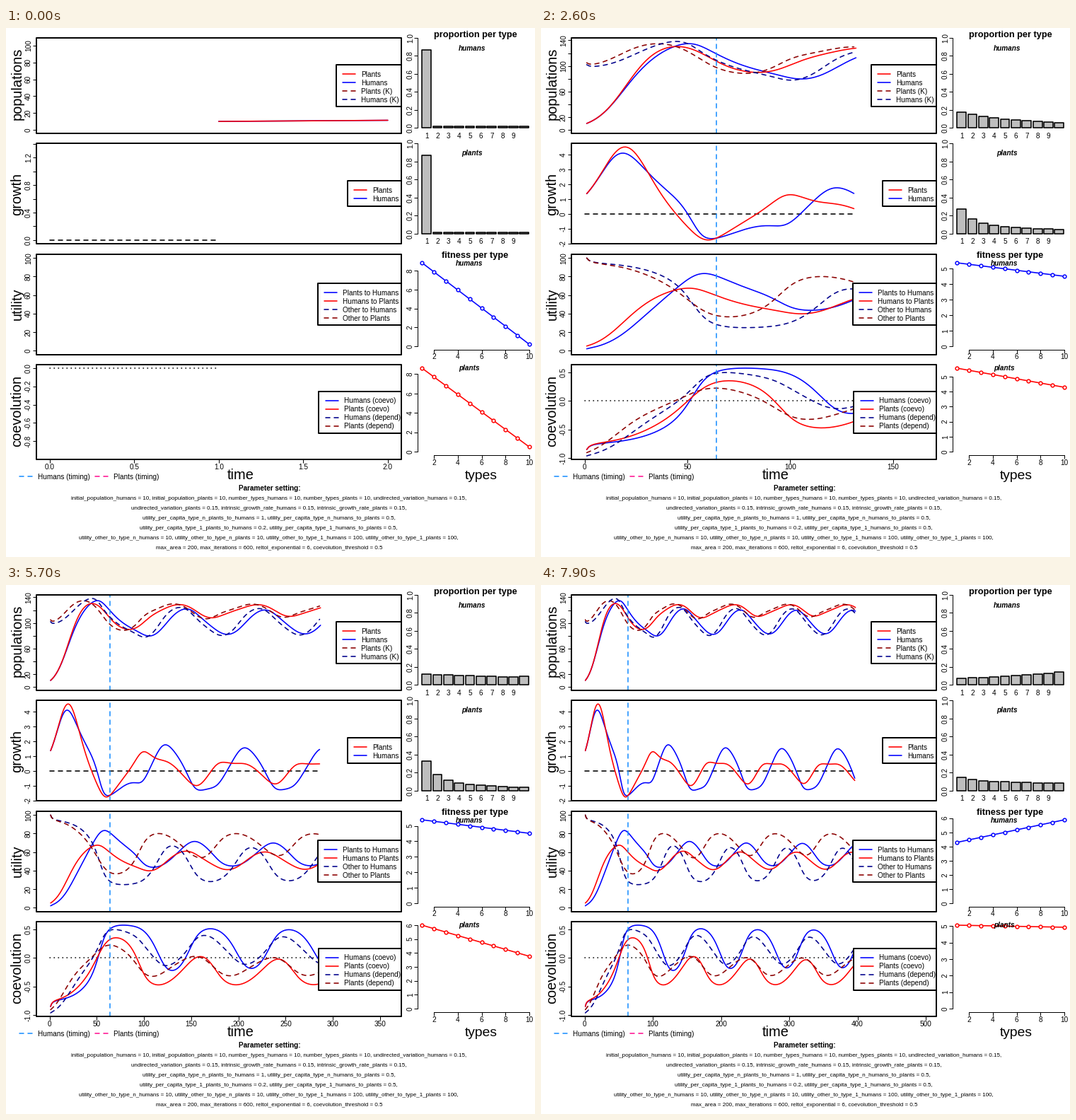
Write a matplotlib script that moves like this. It is 748 px wide and 748 px high and loops after 8000 ms.

```python
import numpy as np
import matplotlib.pyplot as plt
from matplotlib.animation import FuncAnimation
from matplotlib.patches import Rectangle

SIZE, DPI = 748, 100
PX = 72 / DPI
FRAMES, STEP = 80, 5
RED, BLUE, DRED, DBLUE = "#ff0000", "#0000ff", "#8b0000", "#00008b"
DODGER, PINK = "#1e90ff", "#ff1493"
DASH, DOT, SOLID = (6, 6), (0.5, 5.5), None
SMALL, CURVE = 10, 1.6

plt.rcParams.update({
    "font.family": "Liberation Sans",
    "lines.scale_dashes": False,
    "lines.solid_capstyle": "round",
    "lines.dash_capstyle": "round",
    "lines.solid_joinstyle": "round",
})


def simulate(steps, n=10, v=0.15, r=0.15, threshold=0.5):
    """Human-plant coevolution: logistic growth plus selection among types."""
    i = np.arange(1, n + 1)
    weight = np.linspace(-1, 1, n)
    other = np.linspace(100, 10, n)
    gain = np.linspace(0.2, 1, n)
    ph = np.eye(n)[0]
    pp = ph.copy()
    h = p = 10.0
    rows = {k: [] for k in ("H P KH KP gH gP PH HP OH OP cH cP dH dP "
                            "mixH mixP fitH fitP").split()}

    def select(mix, util, oth):
        fit = ((n - i) * oth + i * util) / (oth + util)
        new = mix * fit
        return fit, new / new.sum(), (util - oth) / (util + oth)

    for _ in range(steps):
        u_ph, u_hp = p * (pp @ gain), h * 0.5
        u_oh, u_op = ph @ other, pp @ other
        kh, kp = u_ph + u_oh, min(u_hp + u_op, 200)
        gh, gp = r * h * (1 - h / kh), r * p * (1 - p / kp)
        mh, mp = (1 - v) * ph + v / n, (1 - v) * pp + v / n
        fh, ph, dh = select(mh, u_ph, u_oh)
        fp, pp, dp = select(mp, u_hp, u_op)
        values = (h, p, kh, kp, gh, gp, u_ph, u_hp, u_oh, u_op,
                  mh @ weight, mp @ weight, dh, dp, mh, mp, fh, fp)
        for key, val in zip(rows, values):
            rows[key].append(val)
        h, p = h + gh, p + gp
    data = {k: np.array(a) for k, a in rows.items()}
    data["timing"] = 1 + int(np.argmax(data["cH"] >= threshold))
    return data


sim = simulate(STEP * FRAMES + 2)

fig = plt.figure(figsize=(SIZE / DPI, SIZE / DPI), dpi=DPI, facecolor="white")
ax = fig.add_axes([0, 0, 1, 1])
ax.set(xlim=(0, SIZE), ylim=(SIZE, 0))
ax.axis("off")
live = []


def line(x, y, color="black", dash=SOLID, width=2, z=2, **kw):
    art, = ax.plot(x, y, color=color, lw=width * PX, zorder=z, **kw)
    if dash:
        art.set_dashes([d * PX for d in dash])
    return art


def text(x, y, s, size=SMALL, ha="center", rot=0, **kw):
    return ax.text(x, y, s, fontsize=size * PX, ha=ha, va="baseline",
                   rotation=rot, rotation_mode="anchor", zorder=6, **kw)


def rect(x0, y0, x1, y1, fill, width=2, z=3):
    art = Rectangle((x0, y0), x1 - x0, y1 - y0, fc=fill, ec="black",
                    lw=width * PX, zorder=z, joinstyle="round")
    return ax.add_patch(art)


def pretty(lo, hi):
    cell = (hi - lo) / 5
    base = unit = 10 ** np.floor(np.log10(cell))
    for mult, bias in ((2, 0.8), (5, 1.7), (10, 0.8)):
        if mult * base - cell < bias * (cell - unit):
            unit = mult * base
    first, last = int(np.ceil(lo / unit - 1e-7)), int(np.floor(hi / unit + 1e-7))
    ticks = np.arange(first, last + 1) * unit
    digits = max(0, -int(np.floor(np.log10(unit) + 1e-9)))
    return ticks, [f"{v:.{digits}f}" for v in ticks]


def label_width(s):
    return SMALL * sum({".": 0.278, "-": 0.333}.get(c, 0.556) for c in s)


def axis(pos, labels, edge, base, vertical, spine=True, ticks=True):
    """Ticks at pixel positions; labels that would crowd are left out."""
    arts, xs, ys, last = [], [], [], -1e9
    for q, s in zip(pos, labels):
        a, b = ([edge, edge - 5, np.nan], [q, q, np.nan]) if vertical else \
               ([q, q, np.nan], [edge, edge + 5, np.nan])
        xs += a
        ys += b
        run, half = (-q if vertical else q), label_width(s) / 2
        if run - half - last >= 0.833 * SMALL:
            last = run + half
            arts.append(text(base, q, s, rot=90) if vertical
                        else text(q, base, s))
    if spine:
        ends, flat = [pos[0], pos[-1]], [edge, edge]
        xs += flat if vertical else ends
        ys += ends if vertical else flat
    if ticks:
        arts.append(line(xs, ys, width=1, z=3, solid_capstyle="butt"))
    return arts


def legend(x, y0, y1, entries):
    rect(x, y0, 559, y1, "white", z=4)
    for k, (name, color, dash) in enumerate(entries):
        y = y0 + 13.2 + 12 * k
        line([x + 9.5, x + 27.5], [y, y], color, dash, CURVE, z=5)
        text(x + 35.5, y + 3.8, name, SMALL, "left")


LEFT, RIGHT, X0, XSPAN = 43, 559, 61.7, 478.2

# key, colour, dash for each curve, in drawing order
PANELS = [
    dict(name="populations", box=(14, 149), mid=78.5, zero=None, extra=1,
         curves=[("H", BLUE, SOLID), ("P", RED, SOLID),
                 ("KP", DRED, DASH), ("KH", DBLUE, DASH)],
         legend=(467, 51.5, 111),
         names=["Humans", "Plants", "Plants (K)", "Humans (K)"],
         order=(1, 0, 2, 3)),
    dict(name="growth", box=(163, 305), mid=235, zero=DASH, extra=0,
         curves=[("gH", BLUE, SOLID), ("gP", RED, SOLID)],
         legend=(483, 216, 252), names=["Humans", "Plants"], order=(1, 0)),
    dict(name="utility", box=(320, 461.5), mid=390, zero=None, extra=0,
         curves=[("PH", BLUE, SOLID), ("HP", RED, SOLID),
                 ("OH", DBLUE, DASH), ("OP", DRED, DASH)],
         legend=(441, 360.5, 420),
         names=["Plants to Humans", "Humans to Plants",
                "Other to Humans", "Other to Plants"], order=(0, 1, 2, 3)),
    dict(name="coevolution", box=(476, 610), mid=541, zero=DOT, extra=0,
         curves=[("cH", BLUE, SOLID), ("cP", RED, SOLID),
                 ("dH", DBLUE, DASH), ("dP", DRED, DASH)],
         legend=(442.5, 513.5, 573),
         names=["Humans (coevo)", "Plants (coevo)",
                "Humans (depend)", "Plants (depend)"], order=(0, 1, 2, 3)),
]

PARAMS = [
    "initial_population_humans = 10, initial_population_plants = 10, "
    "number_types_humans = 10, number_types_plants = 10, "
    "undirected_variation_humans = 0.15,",
    "undirected_variation_plants = 0.15, intrinsic_growth_rate_humans = 0.15, "
    "intrinsic_growth_rate_plants = 0.15,",
    "utility_per_capita_type_n_plants_to_humans = 1, "
    "utility_per_capita_type_n_humans_to_plants = 0.5,",
    "utility_per_capita_type_1_plants_to_humans = 0.2, "
    "utility_per_capita_type_1_humans_to_plants = 0.5,",
    "utility_other_to_type_n_humans = 10, utility_other_to_type_n_plants = 10, "
    "utility_other_to_type_1_humans = 100, utility_other_to_type_1_plants = 100,",
    "max_area = 200, max_iterations = 600, reltol_exponential = 6, "
    "coevolution_threshold = 0.5",
]

BARS = [("mixH", 141, 155.8), ("mixP", 290.5, 304.5)]
FITS = [("fitH", BLUE, 450, 454.5, 467.8), ("fitP", RED, 599, 603.5, 617.6)]
BAR_X = 588.3 + 15.35 * np.arange(10)
TYPE_X = 588.2 + 16.88 * np.arange(10)


def draw_static():
    for p in PANELS:
        rect(LEFT, p["box"][0], RIGHT, p["box"][1], "none")
        text(21.5, p["mid"], p["name"], 20, rot=90)
        legend(*p["legend"],
               [(p["names"][k], *p["curves"][k][1:]) for k in p["order"]])
    text(331.5, 638, "time", 20)
    text(671.5, 638.5, "types", 19.3)

    for x, name, color in ((19.5, "Humans", DODGER), (126.5, "Plants", PINK)):
        line([x, x + 18], [634, 634], color, DASH, CURVE)
        text(x + 26, 638, f"{name} (timing)", SMALL, "left")

    text(663.5, 12.5, "proportion per type", 12.7, weight="bold")
    text(663.5, 324.7, "fitness per type", 12.7, weight="bold")
    for x, y, s in ((659.5, 31.5, "humans"), (659.5, 179.5, "plants"),
                    (655, 335.5, "humans"), (655, 483.8, "plants")):
        text(x, y, s, SMALL, weight="bold", style="italic")

    shares = np.arange(6) / 5
    for _, zero, base in BARS:
        axis(zero - 127.3 * shares, [f"{s:.1f}" for s in shares], 582, 574.8, True)
        axis(BAR_X + 6.4, [str(k) for k in range(1, 11)], zero, base, False,
             spine=False, ticks=False)
    for _, _, _, edge, base in FITS:
        axis(TYPE_X[1::2], ["2", "4", "6", "8", "10"], edge, base, False)

    text(373, 654, "Parameter setting:", SMALL, weight="bold")
    for k, s in enumerate(PARAMS):
        text(371.8, 667.2 + 14 * k, s, 7.97)


def draw_panel(p, t, to_x):
    top, bottom = p["box"]
    series = [sim[k][:t + (p["extra"] if k in "HP" else 0)]
              for k, _, _ in p["curves"]]
    lo = min(0, min(s.min() for s in series))
    hi = max(0, max(s.max() for s in series))
    pad = 0.04 * (hi - lo)
    lo, hi = lo - pad, hi + pad

    def to_y(v):
        return bottom - (np.asarray(v) - lo) / (hi - lo) * (bottom - top)

    if p["zero"]:
        live.append(line(to_x(np.array([0, t])), to_y([0, 0]), dash=p["zero"],
                         width=CURVE, z=1.5))
    for (_, color, dash), s in zip(p["curves"], series):
        live.append(line(to_x(np.arange(1, len(s) + 1)), to_y(s), color, dash,
                         CURVE))
    if t > sim["timing"]:
        x = to_x(sim["timing"])
        live.append(line([x, x], [bottom, top], DODGER, DASH, CURVE, z=2.5))
    ticks, labels = pretty(lo, hi)
    live.extend(axis(to_y(ticks), labels, LEFT, 34.8, True, spine=False))


def draw(frame):
    while live:
        live.pop().remove()
    t = 1 + STEP * frame
    span = 1.25 * t + 0.75

    def to_x(v):
        return X0 + v * XSPAN / span

    for p in PANELS:
        draw_panel(p, t, to_x)
    ticks, labels = pretty(-0.04 * span, 1.04 * span)
    live.extend(axis(to_x(ticks), labels, 610, 624, False, spine=False))

    for key, zero, _ in BARS:
        for x, share in zip(BAR_X, sim[key][t - 1]):
            live.append(rect(x, zero - 127.3 * share, x + 12.8, zero, "#bebebe",
                             CURVE))
    for key, color, zero, _, _ in FITS:
        fit = sim[key][t - 1]
        scale = 118 / fit.max()
        live.append(line(TYPE_X, zero - fit * scale, color, width=CURVE,
                         marker="o", ms=4.8 * PX, mfc="white", mew=1.5 * PX))
        ticks, labels = pretty(-0.04 * fit.max(), 1.04 * fit.max())
        live.extend(axis(zero - ticks * scale, labels, 582, 574.8, True))
    return live


draw_static()
anim = FuncAnimation(fig, draw, frames=FRAMES, interval=100, repeat=True,
                     repeat_delay=0, init_func=lambda: draw(0), blit=False)
plt.show()
```
